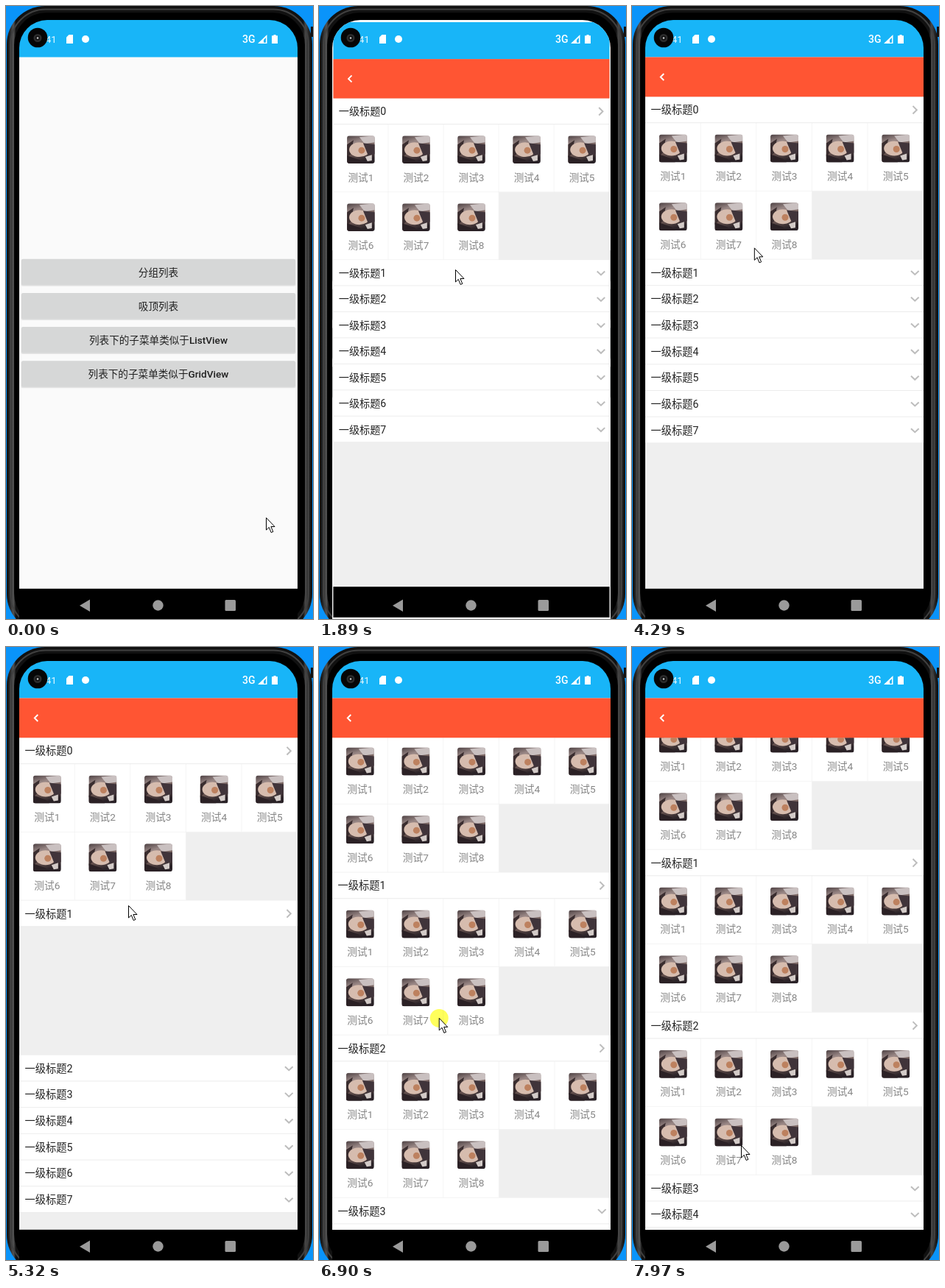
Animation of 417 by 833 pixels, one loop 8000 ms. Source, as an HTML page:

```html
<!DOCTYPE html>
<html lang="zh-CN">
<head>
<meta charset="utf-8">
<title>Grouped list</title>
<style>
html, body { margin: 0; width: 100%; height: 100%; overflow: hidden; background: #0a94fa; }
svg { display: block; width: 100vw; height: 100vh; font-family: Roboto, "Noto Sans CJK SC", "Noto Sans CJK", sans-serif; }
</style>
</head>
<body>
<svg id="stage" viewBox="0 0 417 833">
  <defs>
    <linearGradient id="tone" x1="0" y1="0" x2="0.3" y2="1">
      <stop offset="0" stop-color="#4c4042"/>
      <stop offset="0.3" stop-color="#9a8886"/>
      <stop offset="0.65" stop-color="#6b5652"/>
      <stop offset="1" stop-color="#2a2227"/>
    </linearGradient>
    <linearGradient id="rim">
      <stop offset="0" stop-color="#0c0c0c"/>
      <stop offset="0.012" stop-color="#2b2b2b"/>
      <stop offset="0.022" stop-color="#555"/>
      <stop offset="0.03" stop-color="#111"/>
      <stop offset="0.97" stop-color="#111"/>
      <stop offset="0.978" stop-color="#4a4a4a"/>
      <stop offset="0.988" stop-color="#262626"/>
      <stop offset="1" stop-color="#0c0c0c"/>
    </linearGradient>
    <clipPath id="photoClip"><rect width="38" height="38" rx="3.5"/></clipPath>
    <clipPath id="screenClip"><path d="M18 833V57A38 38 0 0 1 56 19H358A38 38 0 0 1 396 57V833Z"/></clipPath>
    <clipPath id="listClip"><rect x="18" y="123.3" width="378" height="668.5"/></clipPath>
    <g id="photo" clip-path="url(#photoClip)">
      <rect width="38" height="38" fill="url(#tone)"/>
      <path d="M17 2L38 0V9L24 11Z" fill="#c9c0c0"/>
      <path d="M0 12L9 6L5 25L0 30Z" fill="#3a2d2f"/>
      <ellipse cx="17" cy="19" rx="14" ry="10" fill="#d6bcae"/>
      <circle cx="20" cy="20" r="4.5" fill="#bd815f"/>
      <path d="M22 10L38 12V25L29 27Z" fill="#40343a"/>
      <path d="M0 27L17 33L22 38H0Z" fill="#2b2125"/>
      <path d="M25 29L34 26V34L28 35Z" fill="#d3cbc8"/>
    </g>
  </defs>

  <rect width="417" height="833" fill="#0a94fa"/>
  <rect x="414" y="28" width="3" height="14" fill="#111"/>
  <rect x="1" y="0" width="415" height="851" rx="52" fill="url(#rim)"/>
  <rect x="6" y="4.5" width="405" height="842" rx="48" fill="none" stroke="#404040" stroke-width="2"/>
  <rect x="11" y="9" width="395" height="833" rx="44" fill="#000"/>

  <g clip-path="url(#screenClip)">
    <g id="home"></g>
    <g id="page"></g>
  </g>

  <g id="system" fill="#fff">
    <text x="54" y="50" font-size="13" fill-opacity="0.9">41</text>
    <path d="M85.5 39H91V51H82V42.5Z"/>
    <circle cx="108" cy="45" r="5"/>
    <text x="321" y="50.2" font-size="14" font-weight="500">3G</text>
    <path fill-rule="evenodd" d="M354.5 39V51H342ZM353 43L350 46V49.7H353Z"/>
    <path d="M363.5 39H366.5V40.3H369V51H361V40.3H363.5Z"/>
    <circle cx="43" cy="43" r="13.3" fill="#060606"/>
    <circle cx="43" cy="43.5" r="5.5" fill="#2d2d2d"/>
    <circle cx="43" cy="43.5" r="3" fill="#111"/>
    <circle cx="43" cy="43.5" r="1.3" fill="#ccc"/>
  </g>
  <g fill="#9a9a9a">
    <path d="M100 814.7L114 806.5V823Z"/>
    <circle cx="206.5" cy="814.5" r="7.2"/>
    <rect x="297.5" y="807" width="14.5" height="15" rx="1.5"/>
  </g>
  <circle id="touch" r="12.5" fill="#ffff5c" style="mix-blend-mode:multiply"/>
  <path id="cursor" d="M.5 .5V17L4.3 13.4L7.2 20.5L9.8 19.4L6.9 12.5H12Z" fill="#fff" stroke="#000"/>
</svg>
<script>
const LOOP = 8000;
const NS = 'http://www.w3.org/2000/svg';
const $ = id => document.getElementById(id);
const ROW = 35.7, CELL_W = 75.6, CELL_H = 92.7, TOP = 123.4;

function add(parent, tag, attrs = {}, text) {
  const el = document.createElementNS(NS, tag);
  for (const k in attrs) el.setAttribute(k, attrs[k]);
  if (text) el.textContent = text;
  parent.appendChild(el);
  return el;
}
const box = (parent, x, y, width, height, fill, more) =>
  add(parent, 'rect', { x, y, width, height, fill, ...more });

function frameWindow(parent, back) {
  box(parent, 18, 19, 378, 51, '#18b5f8');
  box(parent, 18, 69.5, 378, 723, back);
}

// Home page with four buttons
const home = $('home');
frameWindow(home, '#fafafa');
box(home, 18, 791.8, 378, 42, '#000');
const labels = [['分组列表', ''], ['吸顶列表', ''],
  ['列表下的子菜单类似于', 'ListView'], ['列表下的子菜单类似于', 'GridView']];
let buttonShade;
labels.forEach(([cjk, latin], i) => {
  const y = 343.7 + i * 46.2;
  box(home, 20.5, y + 0.5, 373, 36.5, '#000', { rx: 2.5, opacity: 0.09 });
  box(home, 21, y, 372, 35.5, '#d6d7d7', { rx: 2 });
  if (i === 3) buttonShade = box(home, 21, y, 372, 35.5, '#000', { rx: 2 });
  const label = add(home, 'text', { x: 207, y: y + 22.8, 'font-size': 13.6, 'text-anchor': 'middle', fill: '#212121' }, cjk);
  if (latin) add(label, 'tspan', { 'font-weight': 500 }, latin);
});

// Page with the grouped grid
const page = $('page');
frameWindow(page, '#efefef');
box(page, 18, 791.8, 378, 42, '#000');
const clip = add(page, 'g', { 'clip-path': 'url(#listClip)' });
const list = add(clip, 'g');
box(page, 18, 69.5, 378, 53.8, '#ff5533');
add(page, 'path', { d: 'M43.3 92L38.8 96.5L43.3 101', fill: 'none', stroke: '#fff', 'stroke-width': 1.9 });

function makeGrid(parent) {
  const grid = add(parent, 'g');
  for (let i = 0; i < 8; i++) {
    const x = 18 + (i % 5) * CELL_W, y = ROW + Math.floor(i / 5) * CELL_H;
    box(grid, x, y, CELL_W, CELL_H, '#f4f4f4');
    box(grid, x, y, CELL_W - 0.9, CELL_H - 0.9, '#fff');
    add(grid, 'use', { href: '#photo', x: x + 18.8, y: y + 15.4 });
    add(grid, 'text', { x: x + 37.8, y: y + 77.2, 'font-size': 13.7, 'text-anchor': 'middle', fill: '#858585' }, '测试' + (i + 1));
  }
  return grid;
}

const groups = Array.from({ length: 8 }, (_, i) => {
  const g = add(list, 'g');
  const grid = i < 3 ? makeGrid(g) : null;
  box(g, 18, 0, 378, ROW, '#ececec');
  box(g, 18, 0, 378, ROW - 1, '#fff');
  const shade = box(g, 18, 0, 378, ROW, '#000', { opacity: 0 });
  add(g, 'text', { x: 25.5, y: 23, 'font-size': 14.25, fill: '#222' }, '一级标题' + i);
  const arrow = add(g, 'path', { fill: 'none', stroke: '#bdbdbd', 'stroke-width': 2 });
  return { g, grid, shade, arrow };
});

// Timing helpers
const clamp = v => Math.min(1, Math.max(0, v));
const part = (t, start, dur) => clamp((t - start) / dur);
const smooth = p => (1 - Math.cos(Math.PI * p)) / 2;
const hold = (t, a, b) => t >= a && t < b;

function track(t, keys) {
  let i = keys.findIndex(k => k[0] > t);
  if (i < 0) return keys[keys.length - 1].slice(1);
  if (i === 0) return keys[0].slice(1);
  const a = keys[i - 1], b = keys[i];
  const p = smooth((t - a[0]) / (b[0] - a[0]));
  return a.slice(1).map((v, n) => v + (b[n + 1] - v) * p);
}

const bez = (a, b, c, d, u) => {
  const w = 1 - u;
  return a * w * w * w + 3 * b * u * w * w + 3 * c * u * u * w + d * u * u * u;
};
// Two joined curves: quick start, very slow end
function slowIn(x) {
  const [px, py] = x < 1 / 6
    ? [[0, 0.05, 0.1333, 1 / 6], [0, 0, 0.06, 0.4]]
    : [[1 / 6, 0.2083, 0.25, 1], [0.4, 0.82, 1, 1]];
  let lo = 0, hi = 1;
  for (let i = 0; i < 24; i++) {
    const mid = (lo + hi) / 2;
    if (bez(...px, mid) < x) lo = mid; else hi = mid;
  }
  return bez(...py, lo);
}

const cursorKeys = [
  [40, 353, 695], [860, 206, 484], [1300, 206, 484], [1890, 185, 358],
  [2600, 242, 133], [3930, 242, 133], [4330, 164, 333], [4430, 164, 335],
  [4580, 166, 351], [5430, 166, 351], [5880, 156, 577], [6750, 156, 577],
  [7230, 186, 252], [7380, 186, 252], [7950, 148, 677]
];
const scrollKeys = [[6800, 0], [7130, 178], [7400, 178], [7960, 69]];
const presses = [[940, 1060], [2840, 2960], [3560, 3640], [4890, 5080], [5960, 6120], [6760, 7560]];
// Rows under a group move first, then its cells fade in; closing runs the other way
const opening = (t, start) => [smooth(part(t, start, 250)), part(t, start + 250, 120)];
const closing = (t, start) => [1 - smooth(part(t, start + 120, 250)), 1 - part(t, start, 120)];
const shadeAt = (t, a, b) => 0.12 * part(t, a, 60) * (1 - part(t, b, 120));

function states(t) {
  return [
    { open: t < 3640 ? closing(t, 2970) : opening(t, 3640), on: t < 2970 || t >= 3640,
      shade: shadeAt(t, 2850, 2980) + shadeAt(t, 3560, 3660) },
    { open: opening(t, 5110), on: t >= 5110, shade: shadeAt(t, 4930, 5130) },
    { open: opening(t, 6270), on: t >= 6270, shade: shadeAt(t, 6020, 6270) }
  ];
}

const zoom = s => `translate(207 426) scale(${s}) translate(-207 -426)`;

function draw(t) {
  const p = slowIn(part(t, 1690, 400));
  home.setAttribute('transform', zoom(1 + 0.15 * p));
  home.setAttribute('visibility', t < 2090 ? 'visible' : 'hidden');
  page.setAttribute('transform', zoom(0.85 + 0.15 * p));
  page.setAttribute('opacity', part(t, 1725, 50));
  buttonShade.setAttribute('opacity', shadeAt(t, 940, 1120));

  const s = states(t);
  let y = TOP - track(t, scrollKeys)[0];
  groups.forEach(({ g, grid, shade, arrow }, i) => {
    const st = s[i];
    g.setAttribute('transform', `translate(0 ${y})`);
    arrow.setAttribute('d', st && st.on ? 'M381.5 12.5L386.8 17.8L381.5 23.1' : 'M379 15.5L384.3 20.5L389.6 15.5');
    y += ROW;
    if (!st) return;
    grid.setAttribute('opacity', st.open[1]);
    shade.setAttribute('opacity', st.shade);
    y += st.open[0] * 2 * CELL_H;
  });

  const at = track(t, cursorKeys);
  $('cursor').setAttribute('transform', `translate(${at[0]} ${at[1]})`);
  $('touch').setAttribute('transform', `translate(${at[0] + 0.5} ${at[1] + 0.5})`);
  $('touch').setAttribute('visibility', presses.some(k => hold(t, k[0], k[1])) ? 'visible' : 'hidden');
}

const begin = performance.now();
function tick() {
  draw((performance.now() - begin) % LOOP);
  requestAnimationFrame(tick);
}
tick();
</script>
</body>
</html>
```
